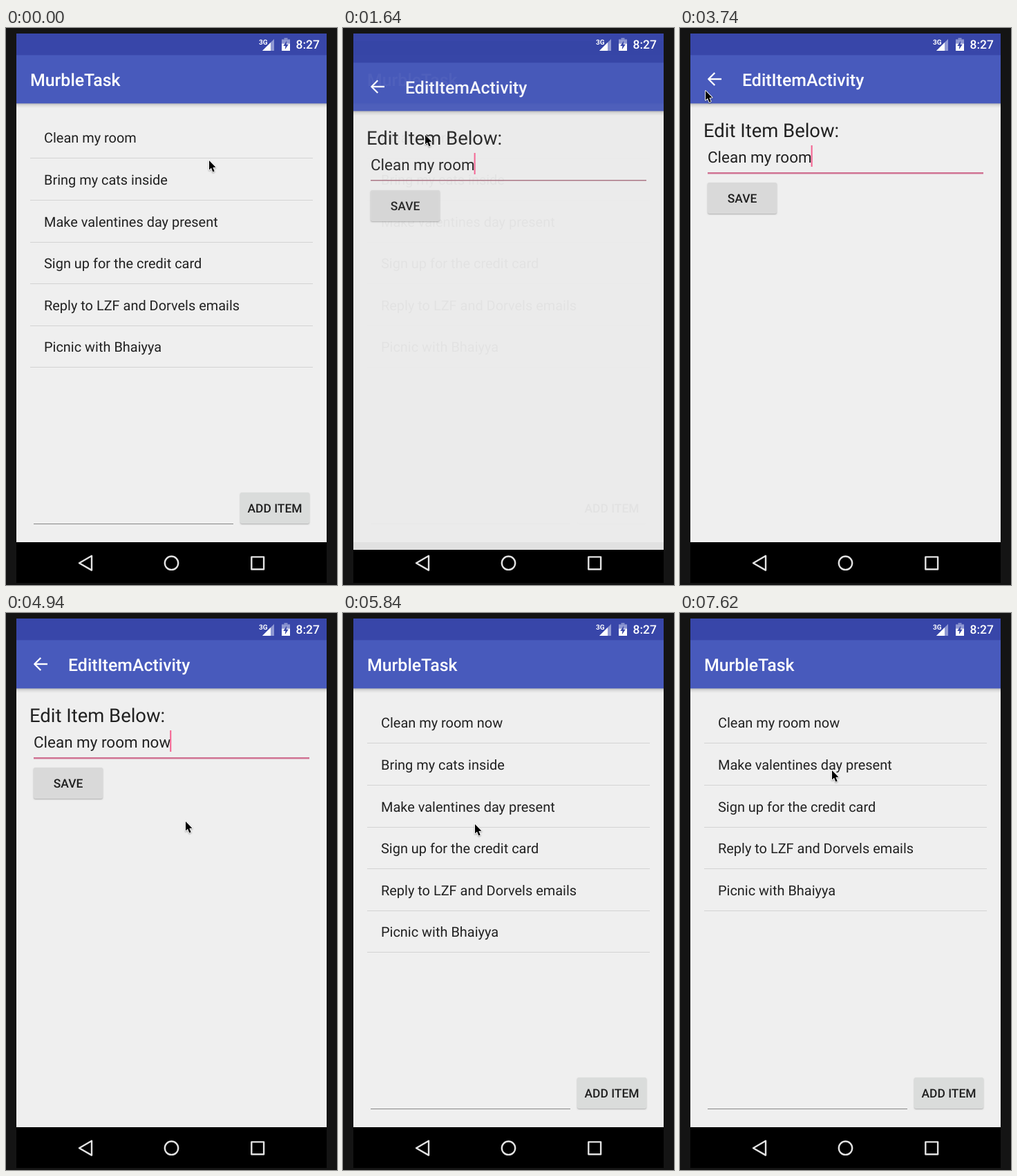
An HTML page with a canvas that plays this animation: 479 px wide and 807 px high, repeating every 8000 ms.

```html
<!DOCTYPE html>
<html lang="en">
<head>
<meta charset="utf-8">
<title>To-do list demo</title>
<style>
html, body { margin: 0; width: 100%; height: 100%; overflow: hidden; background: #141414; }
canvas { display: block; }
</style>
</head>
<body>
<canvas id="stage" width="479" height="807"></canvas>
<script>
const ctx = document.getElementById('stage').getContext('2d');
ctx.textRendering = 'geometricPrecision';

const LOOP = 8000;
const TICK = 149.5; // the screen refreshes about every 150 ms
const LEFT = 15, WIDTH = 449;
const ROW = 60.6;
const STATUS = '#3846a9', BAR = '#485abc', PAGE = '#efefef', INK = '#212121';
const SOFT = '#8f98d2', NAV = '#e2e2e2';

// Story times in ms
const OPEN = 1560, SPACE = 3970, TYPE = 4660, KEY_GAP = 110;
const CLOSE = 5600, PRESS = 6800, REMOVE = 7250;
const FADE = 150;

const items = [
  'Clean my room',
  'Bring my cats inside',
  'Make valentines day present',
  'Sign up for the credit card',
  'Reply to LZF and Dorvels emails',
  'Picnic with Bhaiyya'
];

// Pointer trips between the things it points at
const home = { x: 293, y: 191 };
const trips = [
  { from: 0, to: 440, x: 98, y: 155 },
  { from: 1050, to: 1340, x: 118, y: 154 },
  { from: 1640, to: 2090, x: 166, y: 188 },
  { from: 2800, to: 3735, x: 36, y: 90 },
  { from: 3735, to: 4180, x: 259, y: 301 },
  { from: 4930, to: 5530, x: 88, y: 243 },
  { from: 5530, to: 5830, x: 190, y: 305 },
  { from: 5980, to: 6420, x: 219, y: 227 }
];

const clamp = v => Math.min(1, Math.max(0, v));
const ease = v => v * v * (3 - 2 * v);

function rect(x, y, w, h, color) {
  ctx.fillStyle = color;
  ctx.fillRect(x, y, w, h);
}

function text(str, x, y, size, color = INK, weight = 400, align = 'left') {
  ctx.font = `${weight} ${size}px Roboto, sans-serif`;
  ctx.textAlign = align;
  ctx.fillStyle = color;
  ctx.fillText(str, x, y);
}

function trace(...points) {
  ctx.beginPath();
  points.forEach(([x, y]) => ctx.lineTo(x, y));
}

function fill(color, ...points) {
  trace(...points);
  ctx.fillStyle = color;
  ctx.fill();
}

function stroke(color, width) {
  ctx.strokeStyle = color;
  ctx.lineWidth = width;
  ctx.stroke();
}

function shadow(alpha) {
  ctx.shadowColor = `rgba(0,0,0,${alpha})`;
  ctx.shadowBlur = 2;
  ctx.shadowOffsetY = 1;
}

function button(label, x, y, color) {
  ctx.save();
  shadow(0.28);
  ctx.fillStyle = color;
  ctx.beginPath();
  ctx.roundRect(x, y, 100, 45, 2.5);
  ctx.fill();
  ctx.restore();
  text(label, x + 50, y + 28.6, 17.46, '#1f1f1f', 500, 'center');
}

function drawWindow(title, titleX) {
  rect(LEFT, 8, WIDTH, 32, STATUS);
  rect(LEFT, 109, WIDTH, 636, PAGE);
  const shade = ctx.createLinearGradient(0, 109, 0, 116);
  shade.addColorStop(0, 'rgba(0,0,0,.24)');
  shade.addColorStop(0.45, 'rgba(0,0,0,.08)');
  shade.addColorStop(1, 'rgba(0,0,0,0)');
  rect(LEFT, 109, WIDTH, 7, shade);
  rect(LEFT, 39.3, WIDTH, 70, BAR);
  text(title, titleX, 83.5, 24.9, '#fff', 500);
}

function drawList(time) {
  drawWindow('MurbleTask', 35);
  const rows = items.slice();
  if (time >= CLOSE) rows[0] += ' now';
  if (time >= REMOVE) rows.splice(1, 1);

  if (time >= PRESS && time < REMOVE) {
    rect(35, 189, 409, 60, `rgba(0,0,0,${0.08 * clamp((time - PRESS) / 200)})`);
  }
  rows.forEach((row, i) => {
    text(row, 55, 166.4 + i * ROW, 19.95);
    rect(35, Math.round(188.4 + i * ROW), 409, 1, '#d3d3d3');
  });
  rect(40, 718, 289, 1, '#868686');
  button('ADD ITEM', 339, 673, '#dadcdb');
}

function drawEdit(time, settled) {
  drawWindow('EditItemActivity', 90);
  trace([60, 74], [42, 74]);
  stroke('#fff', 2.4);
  trace([50.3, 65], [41.3, 74], [50.3, 83]);
  stroke('#fff', 2.4);

  text('Edit Item Below:', 34, 158, 27.43);
  const letters = Math.min(3, Math.max(0, Math.floor((time - TYPE) / KEY_GAP) + 1));
  const typed = time < SPACE ? '' : ' now'.slice(0, 1 + letters);
  const value = items[0] + typed;
  text(value, 40, 194.6, 22.45);

  // The caret blinks every second, restarting with each key press
  const lastKey = letters ? TYPE + (letters - 1) * KEY_GAP : typed ? SPACE : OPEN;
  const caretX = 39 + ctx.measureText(value).width;
  rect(40, 209, 399, settled ? 2.5 : 1.5, settled ? '#d07393' : '#a8707f');
  button('SAVE', 40, 224, '#d9d9d9');
  if ((time - lastKey) % 1000 < 500) rect(caretX, 170, 2, 31, '#f5608f');
}

function drawStatusIcons() {
  text('3G', 366, 24, 10, '#fff', 700);
  fill(SOFT, [371, 33], [388, 33], [388, 16]);
  fill('#fff', [371, 33], [383, 33], [383, 21]);
  rect(402.5, 14.5, 5, 2, SOFT);
  rect(399, 16.5, 12, 6, SOFT);
  rect(399, 22.5, 12, 10.5, '#fff');
  fill(STATUS, [406.3, 18.5], [401.3, 26], [404.4, 26], [403.7, 31.3], [408.8, 23.8], [405.7, 23.8]);
  text('8:27', 419.5, 30.3, 17.46, '#fff', 500);
}

function drawNavIcons() {
  ctx.lineJoin = 'round';
  trace([106, 775.2], [124, 764.8], [124, 785.6]);
  ctx.closePath();
  stroke(NAV, 2.4);
  ctx.beginPath();
  ctx.arc(239.5, 775.2, 9.7, 0, Math.PI * 2);
  stroke(NAV, 2.4);
  ctx.beginPath();
  ctx.rect(355.3, 766.4, 17.8, 17.8);
  stroke(NAV, 2.4);
}

function pointerAt(time) {
  let { x, y } = home;
  for (const trip of trips) {
    const k = ease(clamp((time - trip.from) / (trip.to - trip.from)));
    x += (trip.x - x) * k;
    y += (trip.y - y) * k;
  }
  return [x, y];
}

function drawPointer(time) {
  const [x, y] = pointerAt(time);
  ctx.save();
  ctx.translate(x + 1, y + 1);
  trace([0, 0], [0, 13.6], [3, 10.8], [5.3, 16.4], [7.7, 15.4], [5.4, 10], [9.5, 9.7]);
  ctx.closePath();
  shadow(0.35);
  stroke('#fff', 1.8);
  ctx.shadowColor = 'transparent';
  ctx.fillStyle = '#000';
  ctx.fill();
  ctx.restore();
}

function draw(clock) {
  const time = Math.floor((clock + 12) / TICK) * TICK;
  rect(0, 0, 479, 807, '#141414');
  rect(LEFT, 745, WIDTH, 59, '#000');

  const editing = time >= OPEN && time < CLOSE + FADE;
  const entering = editing && time < OPEN + FADE;
  const leaving = editing && time >= CLOSE;
  if (!editing || entering || leaving) drawList(time);
  if (editing) {
    ctx.save();
    if (entering) {
      rect(LEFT, 19, WIDTH, 726, 'rgba(0,0,0,.2)');
      ctx.globalAlpha = 0.945;
    }
    ctx.translate(0, entering ? 11 : leaving ? 7 : 0);
    drawEdit(time, !entering);
    ctx.restore();
  }
  drawStatusIcons();
  drawNavIcons();
  drawPointer(time);
}

const start = performance.now();
function loop() {
  draw((performance.now() - start) % LOOP);
  requestAnimationFrame(loop);
}
loop();
</script>
</body>
</html>
```
